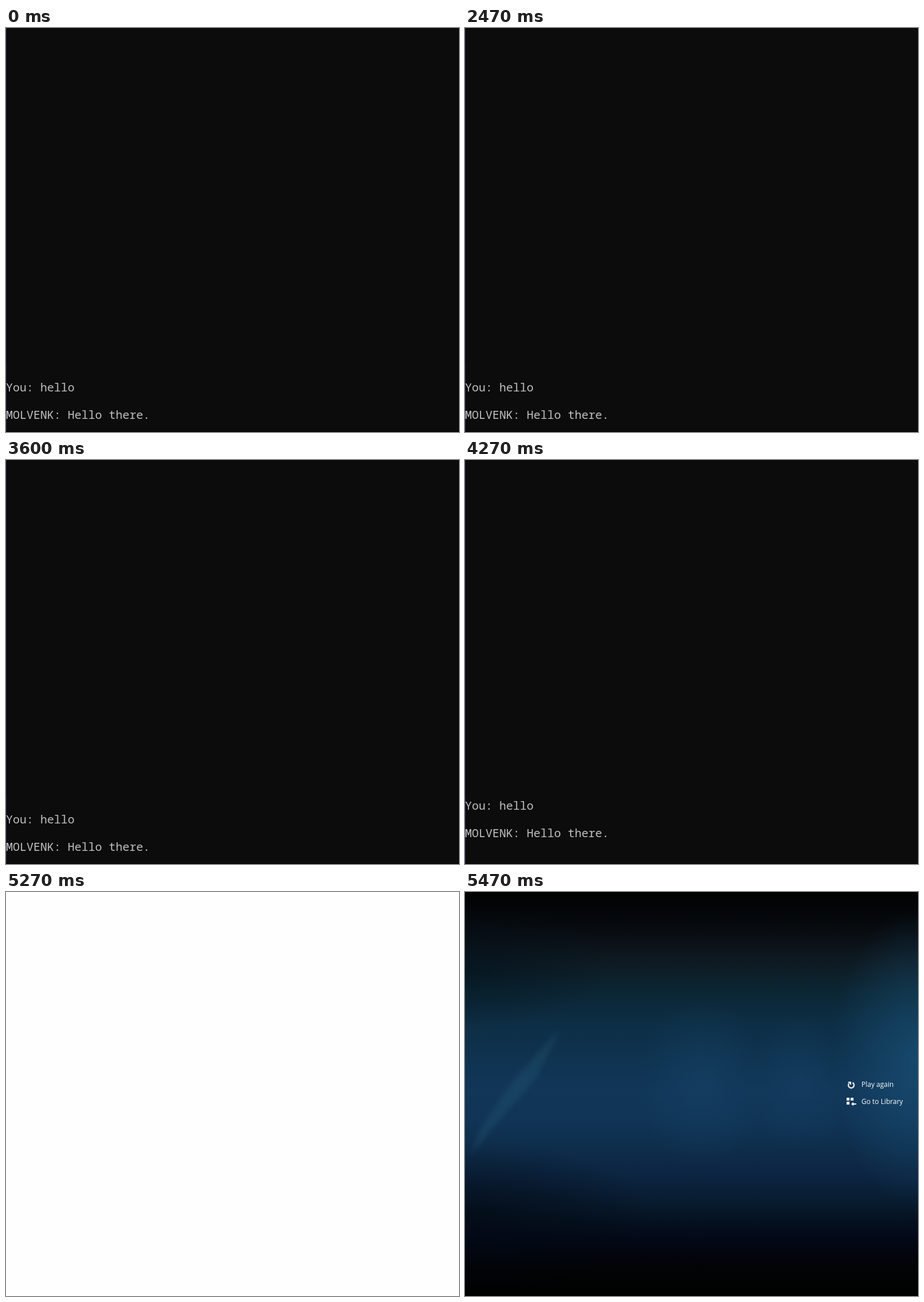
Write an HTML page that moves like this. It is 793 by 707 pixels and loops after 5.67 s.

```html
<!DOCTYPE html>
<html lang="en">
<head>
<meta charset="utf-8">
<title>Console chat</title>
<style>
  html, body { margin: 0; width: 100%; height: 100%; overflow: hidden; background: #0c0c0c; }
  #backdrop, svg { position: absolute; left: 0; top: 0; width: 793px; height: 707px; }
  #backdrop {
    background:
      radial-gradient(150px 260px at 793px 290px, #1b567e99, #1b567e00),
      radial-gradient(110px 150px at 415px 335px, #15466a70, #15466a00),
      radial-gradient(90px 120px at 585px 335px, #15466a60, #15466a00),
      radial-gradient(330px 130px at 0 565px, #020812a0, #02081200),
      radial-gradient(260px 110px at 0 130px, #00101c80, #00101c00),
      linear-gradient(#000202, #05080b 45px, #0a0f14 80px, #0e1b23 125px, #0c2634 175px,
        #0d2e45 230px, #0f3350 290px, #113658 350px, #103455 400px, #0e2d4b 450px,
        #0c2440 500px, #081b2e 545px, #05101e 580px, #040919 605px, #02050d 635px,
        #010304 665px, #000202);
  }
  .console { font: 20px "Noto Sans Mono", monospace; fill: #c2c2c2; }
  #menu { font: 12px "Open Sans", "Noto Sans", sans-serif; fill: #fff; }
  #streak { fill: #2a617c; opacity: .28; filter: blur(5px); }
</style>
</head>
<body>
<div id="backdrop"></div>
<svg viewBox="0 0 793 707">
  <path id="streak" d="M168 238L125 325L60 400L8 462L28 412L88 325Z"/>
  <g id="console" class="console">
    <rect width="793" height="707" fill="#0c0c0c"/>
    <rect width="1" height="587" fill="#1d1540"/>
    <rect y="587" width="1" height="119" fill="#2c1c50"/>
    <rect y="706" width="793" height="1" fill="#020202"/>
    <g id="chat">
      <text y="636">You: hello</text>
      <text y="684">MOLVENK: Hello there.</text>
    </g>
  </g>
  <rect id="flash" width="793" height="707" fill="#fefefe"/>
  <g id="menu">
    <path d="M678.5 333.6A5 5 0 1 1 672 335" fill="none" stroke="#e8e8e8" stroke-width="2.4"/>
    <path d="M670 332h6v6z"/>
    <path d="M668 360h5v5h-5zM675 360h5v5h-5zM668 367h5v5h-5zM676 371l4-3.5v2.5h5v2h-5v2.5z"/>
    <text x="694" y="341">Play again</text>
    <text x="694" y="371">Go to Library</text>
  </g>
</svg>
<script>
  const LOOP = 5670, SCROLL = 4130, FLASH = 5270, MENU = 5330, LIBRARY = 5470;
  const get = id => document.getElementById(id);
  const show = (id, visible) => { get(id).style.display = visible ? '' : 'none'; };
  let start;

  function draw(now) {
    start ??= now;
    const t = (now - start) % LOOP;
    get('chat').setAttribute('transform', `translate(0 ${t < SCROLL ? 0 : -24})`);
    show('console', t < LIBRARY);
    show('flash', t >= FLASH && t < MENU);
    show('menu', t >= MENU);
    requestAnimationFrame(draw);
  }
  requestAnimationFrame(draw);
</script>
</body>
</html>
```
